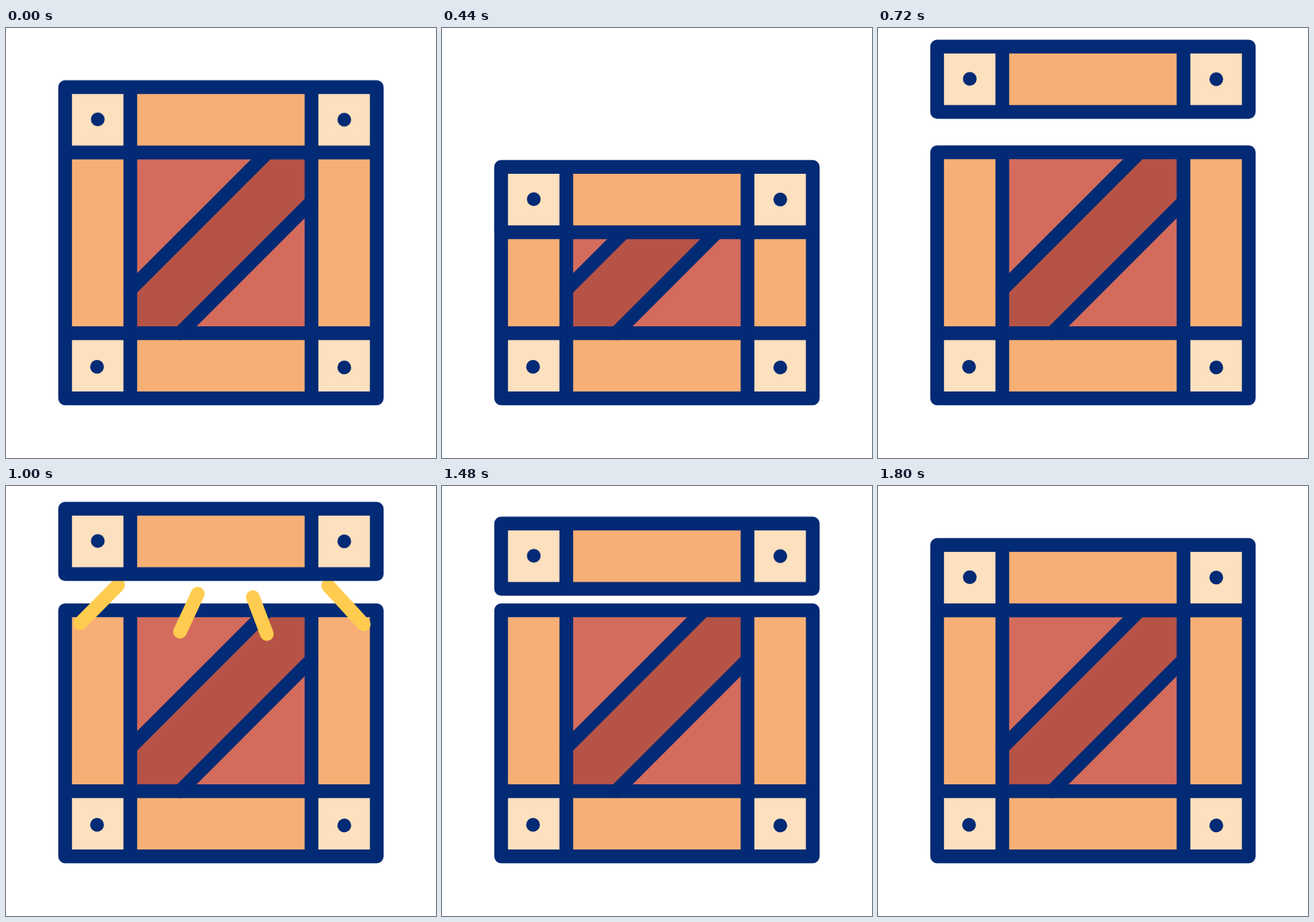
These frames come from a looping animation (640x640 px, 2000 ms). An HTML page:

```html
<!DOCTYPE html>
<html lang="en">
<head>
<meta charset="utf-8">
<title>Crate</title>
<style>
  @property --head { syntax: "<length>"; inherits: true; initial-value: 0px; }
  @property --tail { syntax: "<length>"; inherits: true; initial-value: 0px; }

  html, body { margin: 0; width: 100%; height: 100%; overflow: hidden; background: #fff; }
  svg { display: block; width: 100%; height: 100%; }

  .line { fill: none; stroke: #032a75; stroke-width: 20.4; stroke-linecap: round; stroke-linejoin: round; }
  .dot { fill: #032a75; }
  .cream { fill: #fde0be; }
  .plank { fill: #f7af75; }
  .panel { fill: #d46c5d; }
  .brace { fill: #b55347; }

  .lid { animation: lid 2s infinite; }
  .sparks {
    fill: none;
    stroke: #ffcc4f;
    stroke-width: 20.4;
    stroke-linecap: round;
    stroke-dasharray: calc(var(--head) - var(--tail)) 300px;
    stroke-dashoffset: calc(-1 * var(--tail));
    animation: head 2s infinite, tail 2s infinite, show 2s step-end infinite;
  }

  /* Squash down, spring up, then settle back */
  @keyframes lid {
    0%   { transform: translateY(0);       animation-timing-function: cubic-bezier(.333, .28, .667, .64); }
    10%  { transform: translateY(51.5px);  animation-timing-function: cubic-bezier(.333, .333, .667, .68); }
    22%  { transform: translateY(118.7px); animation-timing-function: cubic-bezier(.333, .457, .667, .92); }
    25%  { transform: translateY(130.5px); animation-timing-function: cubic-bezier(.35, .1, .65, 1); }
    35%  { transform: translateY(-60.5px); animation-timing-function: cubic-bezier(.333, .3, .667, .64); }
    50%  { transform: translateY(-53.9px); animation-timing-function: cubic-bezier(.333, .31, .667, .613); }
    56%  { transform: translateY(-50.8px); animation-timing-function: cubic-bezier(.333, .19, .667, .36); }
    74%  { transform: translateY(-32px);   animation-timing-function: cubic-bezier(.333, .244, .667, .756); }
    84%  { transform: translateY(-4.7px);  animation-timing-function: cubic-bezier(.333, .85, .667, 1); }
    90%, 100% { transform: translateY(0); }
  }
  @keyframes head {
    0%, 37% { --head: 0px; animation-timing-function: cubic-bezier(.3, .2, .7, .8); }
    58%, 100% { --head: 100px; }
  }
  @keyframes tail {
    0%, 45% { --tail: 0px; animation-timing-function: cubic-bezier(.3, .2, .7, .8); }
    66%, 100% { --tail: 100px; }
  }
  @keyframes show {
    0%, 66%, 100% { visibility: hidden; }
    37% { visibility: visible; }
  }
</style>
</head>
<body>
<svg viewBox="0 0 640 640">
  <g class="body">
    <path class="plank" d="M88 185H551.8V551.3H88Z"/>
    <path class="panel" d="M185 185H454.7V454.2H185Z"/>
    <path class="brace" d="M185 389.5L389.5 185H454.7V258.5L259 454.2H185Z"/>
    <path class="cream" d="M88 454.2H185V551.3H88ZM454.7 454.2H551.8V551.3H454.7Z"/>
    <path class="line" d="M185 389.5L389.5 185M259 454.2L454.7 258.5"/>
    <path class="line" d="M88 185H551.8V551.3H88ZM88 454.2H551.8M185 185V551.3M454.7 185V551.3"/>
    <circle class="dot" cx="135.5" cy="504.3" r="10.2"/>
    <circle class="dot" cx="503.5" cy="505.2" r="10.2"/>
  </g>

  <g class="sparks">
    <path pathLength="100" d="M195 119L62 253"/>
    <path pathLength="100" d="M298.6 132L236.5 265"/>
    <path pathLength="100" d="M357 138L406 267"/>
    <path pathLength="100" d="M453 119.5L577.5 255"/>
  </g>

  <g class="lid">
    <!-- hides the crate above the lid while it is pressed down -->
    <path fill="#fff" d="M70 -120H570V88H70Z"/>
    <path class="plank" d="M88 87.7H551.8V185H88Z"/>
    <path class="cream" d="M88 87.7H185V185H88ZM454.7 87.7H551.8V185H454.7Z"/>
    <path class="line" d="M88 87.7H551.8V185H88ZM185 87.7V185M454.7 87.7V185"/>
    <circle class="dot" cx="136.6" cy="135.7" r="10.2"/>
    <circle class="dot" cx="503.5" cy="136.2" r="10.2"/>
  </g>
</svg>
</body>
</html>
```
